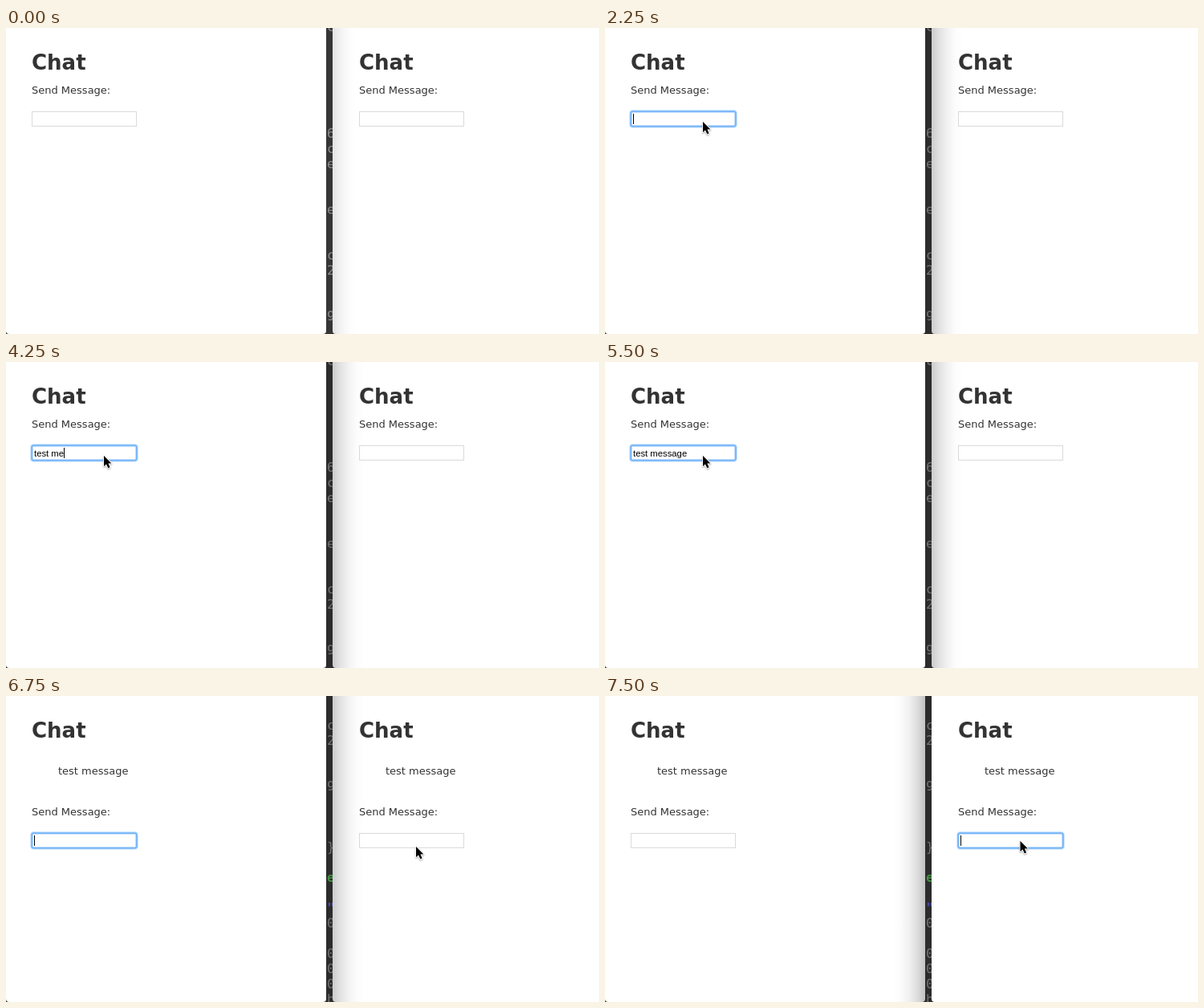
Recreate the animation shown at these times as an HTML page with a canvas. Size 739 by 382 pixels, loop 8 s.

```html
<!DOCTYPE html>
<html lang="en">
<head>
<meta charset="utf-8">
<title>Chat in two windows</title>
<style>
  html, body { margin: 0; width: 100%; height: 100%; overflow: hidden; background: #fff; }
  canvas { display: block; }
</style>
</head>
<body>
<canvas id="stage" width="739" height="382"></canvas>
<script>
const ctx = document.getElementById('stage').getContext('2d');
const W = 739, H = 382, LOOP = 8000;
const GAP_LEFT = 399, GAP_RIGHT = 407;
const ACTIVATE_LEFT = 1750, FOCUS_LEFT = 2250, SEND = 5750;
const ACTIVATE_RIGHT = 7000, FOCUS_RIGHT = 7500;
const SANS = '"DejaVu Sans", sans-serif';
const MONO = '16px "DejaVu Sans Mono", monospace';

// [time, field text, caret offset from the window's left edge]
const KEYS = [
  [FOCUS_LEFT, '', 35], [2500, 't', 39], [2750, 'te', 45], [3000, 'tes', 50],
  [3250, 'test', 54], [4000, 'test ', 57], [4250, 'test me', 72],
  [4500, 'test mes', 78], [4750, 'test messa', 89], [5000, 'test message', 102],
  [SEND, '', 35], [FOCUS_RIGHT, '', 35]
];

// [time, x, y]
const POINTER = [
  [1000, 433, 197], [1250, 288, 168], [1500, 142, 112.5], [2000, 121, 116],
  [6500, 258, 140], [6750, 510, 187], [7250, 516.5, 180]
];

// [glyph, baseline, colour, weight]
const CODE_BEFORE = [
  ['c', 4], ['6', 137], ['c', 156], ['e', 175], ['e', 232],
  ['c', 289], ['2', 308], ['9', 365]
];
const CODE_AFTER = [
  ['c', 42], ['2', 61], ['9', 118], ['}', 194], ['e', 232, '#4fae4f', 'bold'],
  ['"', 270, '#5c5cd6', 'bold'], ['0', 289], ['0', 327], ['0', 346], ['0', 365], ['b', 384]
];

const latest = (steps, t) => steps.findLast(step => t >= step[0]);

function text(string, x, y, font, color) {
  ctx.font = font;
  ctx.fillStyle = color;
  ctx.fillText(string, x, y);
}

function drawGap(t) {
  ctx.save();
  ctx.beginPath();
  ctx.rect(GAP_LEFT, 0, GAP_RIGHT - GAP_LEFT, H);
  ctx.clip();
  ctx.fillStyle = '#363636';
  ctx.fillRect(GAP_LEFT, 0, GAP_RIGHT - GAP_LEFT, H);
  for (const [glyph, y, color = '#8c8c8c', weight = ''] of t < SEND ? CODE_BEFORE : CODE_AFTER)
    text(glyph, 400, y, `${weight} ${MONO}`, color);
  if (t >= ACTIVATE_LEFT) {
    ctx.fillStyle = 'rgba(0,0,0,.18)';
    ctx.fillRect(GAP_LEFT, 0, GAP_RIGHT - GAP_LEFT, H);
  }
  ctx.restore();
}

// Shadow cast on the neighbouring window; negative size fades to the left.
function drawShadow(x, size, strength) {
  const fade = ctx.createLinearGradient(x, 0, x + size, 0);
  for (let k = 0; k <= 1; k += 0.25)
    fade.addColorStop(k, `rgba(0,0,0,${strength * (1 - k) ** 2})`);
  ctx.fillStyle = fade;
  ctx.fillRect(x, 0, size, H);
}

function drawWindow(x, width) {
  ctx.fillStyle = '#fff';
  ctx.beginPath();
  ctx.roundRect(x, -10, width, H + 10, 4);
  ctx.fill();
}

function drawField(x, y, focused) {
  if (focused) {
    ctx.strokeStyle = 'rgba(105,175,250,.3)';
    ctx.lineWidth = 5;
    ctx.beginPath();
    ctx.roundRect(x + 0.5, y + 0.5, 130, 18, 2);
    ctx.stroke();
    ctx.strokeStyle = '#76b5f7';
    ctx.lineWidth = 2.6;
    ctx.stroke();
    ctx.fillStyle = '#fff';
    ctx.fillRect(x + 1.5, y + 1.5, 128, 16);
  } else {
    ctx.strokeStyle = '#dadada';
    ctx.lineWidth = 1;
    ctx.strokeRect(x + 0.5, y + 0.5, 130, 18);
  }
}

function drawPage(left, t, focused) {
  const sent = t >= SEND;
  const shift = sent ? 67 : 0;
  const x = left + 32;
  text('Chat', x, 52, `bold 26px ${SANS}`, '#333');
  if (sent) text('test message', x + 33, 98, `13px ${SANS}`, '#333');
  text('Send Message:', x, 82 + shift, `13px ${SANS}`, '#333');
  drawField(x, 104 + shift, focused);
  if (!focused) return;
  const [since, typed, caret] = latest(KEYS, t);
  text(typed, x + 3, 118 + shift, '11.3px "Liberation Sans", Arial, sans-serif', '#000');
  if ((t - since) % 1000 < 500) ctx.fillRect(left + caret, 107 + shift, 1, 13);
}

const arrow = new Path2D('M1 1V14.2L4 11.4L6.3 16.6L8.6 15.6L6.4 10.5H10.4Z');

function drawPointer(t) {
  const step = latest(POINTER, t);
  if (!step) return;
  ctx.save();
  ctx.translate(step[1], step[2]);
  ctx.shadowColor = 'rgba(0,0,0,.35)';
  ctx.shadowBlur = 2;
  ctx.shadowOffsetY = 1;
  ctx.strokeStyle = '#fff';
  ctx.lineWidth = 1.8;
  ctx.lineJoin = 'round';
  ctx.stroke(arrow);
  ctx.shadowColor = 'transparent';
  ctx.fillStyle = '#000';
  ctx.fill(arrow);
  ctx.restore();
}

function draw(t) {
  ctx.fillStyle = '#363636';
  ctx.fillRect(0, 0, W, H);
  drawGap(t);
  drawWindow(0, GAP_LEFT);
  drawWindow(GAP_RIGHT, W);
  if (t < ACTIVATE_LEFT) drawShadow(GAP_RIGHT, 30, 0.11);
  else if (t < ACTIVATE_RIGHT) drawShadow(GAP_RIGHT, 40, 0.2);
  else drawShadow(GAP_LEFT, -40, 0.24);
  drawPage(0, t, t >= FOCUS_LEFT && t < ACTIVATE_RIGHT);
  drawPage(408, t, t >= FOCUS_RIGHT);
  drawPointer(t);
}

const start = performance.now();
function tick() {
  draw((performance.now() - start) % LOOP);
  requestAnimationFrame(tick);
}
tick();
</script>
</body>
</html>
```
